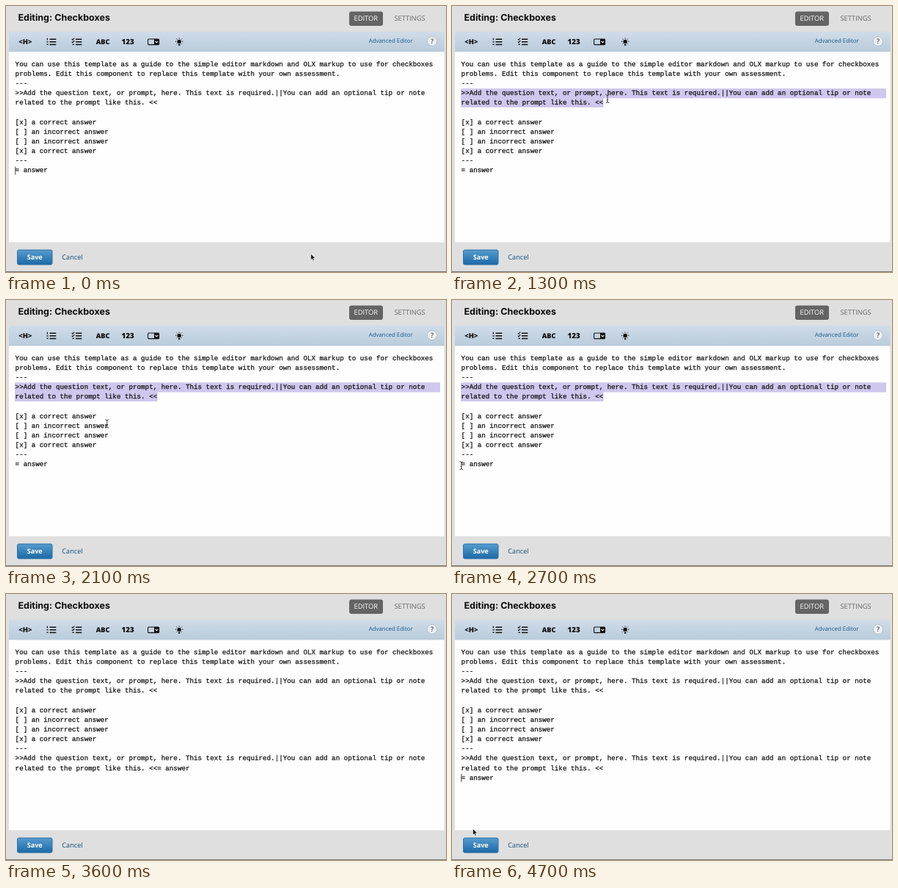
These frames come from a looping animation (600x362 px, 4.8 s). An HTML page:

```html
<!DOCTYPE html>
<html lang="en">
<head>
<meta charset="utf-8">
<title>Checkbox editor</title>
<style>
html, body { margin: 0; width: 100%; height: 100%; overflow: hidden; background: #dfdfdf }
svg { display: block; width: 600px; height: 362px; font-family: "Open Sans", sans-serif; text-rendering: geometricPrecision }
text { white-space: pre }
#code { font: 9.22px "Liberation Mono", monospace; fill: #111; stroke: #111; stroke-width: .25px }
.title { font: 700 12.5px Inter, sans-serif; fill: #0c0c0c }
.nav { font-size: 9.3px }
.tool { font-weight: 800; fill: #111 }
</style>
</head>
<body>
<svg viewBox="0 0 600 362">
  <defs>
    <linearGradient id="bar" x2="0" y2="1"><stop stop-color="#d0dce8"/><stop offset="1" stop-color="#b9cbdb"/></linearGradient>
    <linearGradient id="btn" x2="0" y2="1"><stop stop-color="#569ccd"/><stop offset="1" stop-color="#1d69a6"/></linearGradient>
  </defs>
  <rect width="600" height="362" fill="#dfdfdf"/>
  <path d="M0 361.5H600" stroke="#777"/>
  <text class="title" x="16.5" y="20.4">Editing: Checkboxes</text>
  <rect x="468" y="7.5" width="46" height="19.5" rx="3" fill="#646464"/>
  <text class="nav" x="474.5" y="20.1" fill="#fff">EDITOR</text>
  <text class="nav" x="529.5" y="20.1" fill="#666">SETTINGS</text>

  <rect x="4" y="35" width="593.5" height="27.5" fill="url(#bar)"/>
  <rect x="4" y="62.5" width="593.5" height="259" fill="#fefefe"/>
  <g class="tool">
    <text x="17.3" y="51.8" font-size="9.5">&lt;H&gt;</text>
    <text x="122.7" y="51.8" font-size="9.2">ABC</text>
    <text x="157.5" y="52" font-size="9.9">123</text>
  </g>
  <g fill="none" stroke="#111" stroke-width="1.5">
    <path d="M59.5 45.2H68.3M59.5 48.8H68.3M59.5 52.4H68.3M95 45.2H103.3M95 48.8H103.3M95 52.4H103.3"/>
    <path d="M56.4 43.8V46.6M55.4 48.8H57.6M55.4 52.4H57.6" stroke-width="1.2"/>
    <path d="M89.8 45l1.2 1.2 2.3-2.7M89.8 48.6l1.2 1.2 2.3-2.7M90.5 52.4H93" stroke-width="1.1"/>
    <rect x="193.6" y="45" width="15" height="7.6" rx="1" stroke-width="1.1"/>
    <path d="M202 45H208.6V52.6H202Z" fill="#111" stroke="none"/>
    <path d="M203.6 48l1.8 1.8 1.8-1.8" stroke="#fff" stroke-width="1.1"/>
    <path d="M236.2 43.4V44.6M231 48.2H232.4M240 48.2H241.4M232.5 44.5l1 1M239.9 44.5l-1 1M232.7 51.8l.9-.8M239.7 51.8l-.9-.8" stroke-width="1"/>
    <path d="M235 52.8H237.4" stroke-width="2"/>
  </g>
  <circle cx="236.2" cy="48.4" r="2.7" fill="#111"/>
  <text x="494.7" y="49.6" font-size="7.9" fill="#145a92">Advanced Editor</text>
  <circle cx="581" cy="48" r="6.5" fill="#edf1f5" stroke="#a5b0bb" stroke-width=".7"/>
  <text x="581" y="51.4" font-size="9" font-weight="600" fill="#444" text-anchor="middle">?</text>

  <path id="sel" fill="#cfc7ed"/>
  <g id="code"></g>
  <path id="caret" stroke="#444"/>

  <rect x="15.5" y="332" width="47.5" height="20" rx="2" fill="url(#btn)" stroke="#2a70a8"/>
  <text x="39.2" y="344.8" font-size="9.1" font-weight="700" fill="#fff" text-anchor="middle">Save</text>
  <text x="76.3" y="344.8" font-size="9.2" fill="#0f4c7c">Cancel</text>

  <path id="beam" d="M-2.5-5.5Q0-5.5 0-4Q0-5.5 2.5-5.5M0-4.5V4.5M-2.5 5.5Q0 5.5 0 4Q0 5.5 2.5 5.5M-1.2 1.5H1.2" fill="none" stroke="#222" stroke-width=".8"/>
  <path id="arrow" d="M0 0V8.4L1.9 6.7L3.2 9.5L4.6 8.9L3.4 6.1H6Z" fill="#111" stroke="#fff" stroke-width=".6"/>
</svg>
<script>
const LOOP = 4800, TICK = 100, LEFT = 12.8, LINE = 13.18;
const $ = id => document.getElementById(id);
const prompt = [
  '>>Add the question text, or prompt, here. This text is required.||You can add an optional tip or note',
  'related to the prompt like this. <<'];
const body = [
  'You can use this template as a guide to the simple editor markdown and OLX markup to use for checkboxes',
  'problems. Edit this component to replace this template with your own assessment.',
  '---', ...prompt, '',
  '[x] a correct answer', '[ ] an incorrect answer', '[ ] an incorrect answer', '[x] a correct answer', '---'];
const last = '= answer';

// pointer stops: time, x, y
const path = [
  [0, 415.7, 337.2], [100, 415.7, 337.2], [700, 12, 118.5], [800, 12, 118.5], [1200, 205, 121],
  [1400, 219, 131.5], [1800, 219, 131.5], [2500, 12.8, 225.3], [3400, 12.8, 225.3]];
const exit = [[4500, 60, 241], [4600, 43, 284], [4700, 28.5, 319.5], [4800, 28.5, 319.5]];
// caret: on, off, x, line
const blinks = [
  [0, 300, LEFT, 11], [2800, 3200, LEFT, 11], [3200, 3400, 207, 12],
  [3700, 3900, LEFT, 13], [4200, 4500, LEFT, 13], [4700, 4800, LEFT, 13]];

const rows = Array.from({ length: 14 }, (_, i) => {
  const row = document.createElementNS('http://www.w3.org/2000/svg', 'text');
  row.setAttribute('x', 12.6);
  row.setAttribute('y', 81.5 + i * LINE);
  return $('code').appendChild(row);
});

function pointer(t) {
  const stops = t < 3400 ? path : exit;
  const i = stops.findIndex((p, k) => t >= p[0] && stops[k + 1] && t < stops[k + 1][0]);
  if (i < 0) return null;
  const [t0, x0, y0] = stops[i], [t1, x1, y1] = stops[i + 1];
  const u = (t - t0) / (t1 - t0), e = u * u * (3 - 2 * u);
  return [x0 + (x1 - x0) * e, y0 + (y1 - y0) * e];
}

function selection(t, p) {
  if (t < 900 || t >= 2800) return '';
  return t < 1300
    ? `M12 112.3H${p[0]}V125.6H12Z`
    : 'M12 112.3H592V125.6H206.5V138H12Z';
}

function draw(t) {
  const tail = t < 3200 ? [last]
    : t < 3700 ? [prompt[0], prompt[1] + last]
    : [...prompt, last];
  const text = [...body, ...tail];
  rows.forEach((row, i) => row.textContent = text[i] || '');

  const p = pointer(t);
  $('sel').setAttribute('d', selection(t, p));

  const c = blinks.find(b => t >= b[0] && t < b[1]);
  $('caret').setAttribute('d', c ? `M${c[2]} ${73.5 + c[3] * LINE}v11` : '');

  const inText = p && p[1] < 316;
  for (const [id, on] of [['beam', inText], ['arrow', p && !inText]]) {
    $(id).style.display = on ? '' : 'none';
    if (on) $(id).setAttribute('transform', `translate(${p})`);
  }
}

function frame() {
  const t = performance.now() % LOOP;
  draw(Math.floor(t / TICK) * TICK);
  requestAnimationFrame(frame);
}
frame();
</script>
</body>
</html>
```
